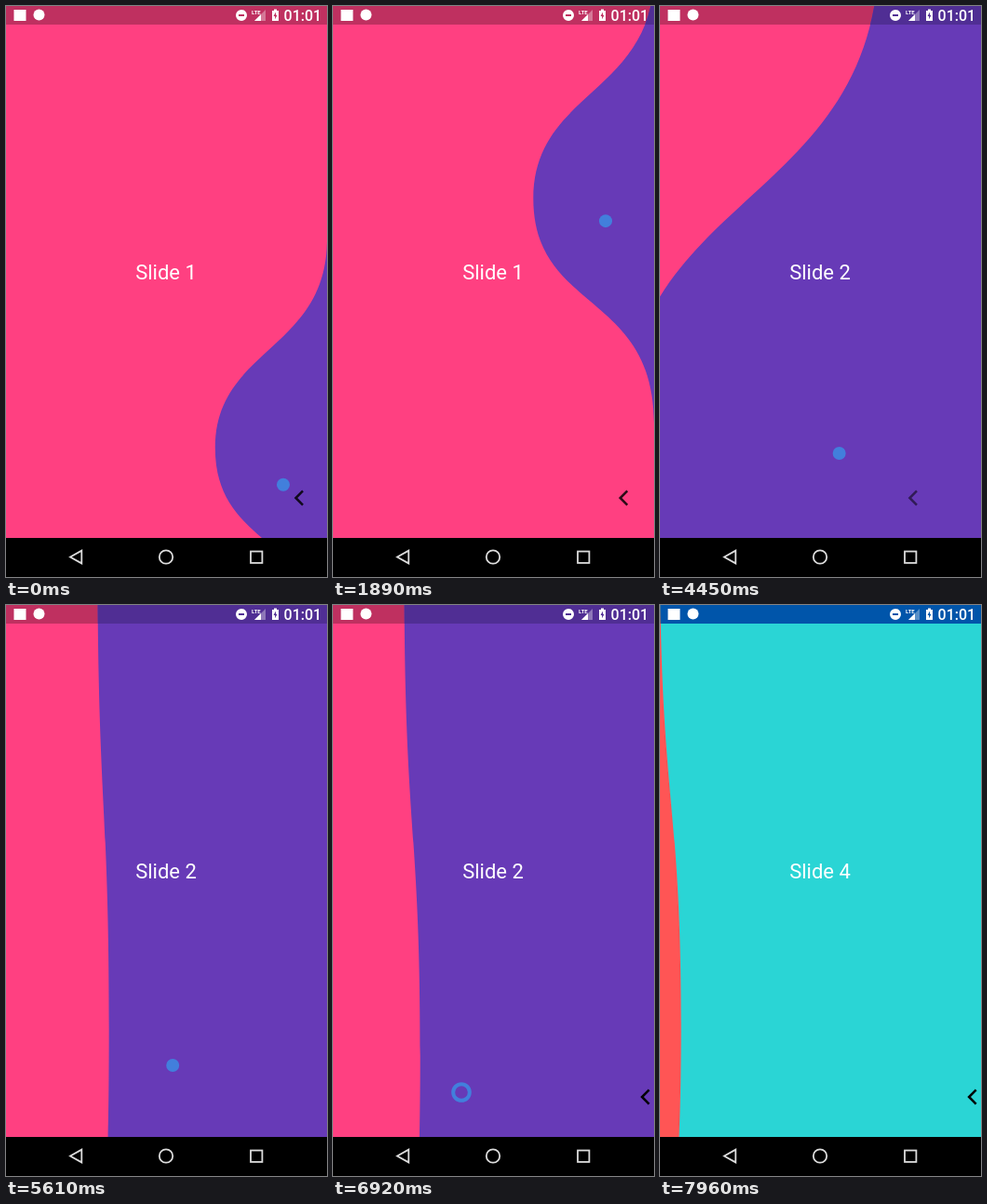
Write an HTML page that moves like this. It is 345x614 px and loops after 8 s.

```html
<!DOCTYPE html>
<html lang="en">
<head>
<meta charset="utf-8">
<title>Liquid swipe</title>
<style>
html, body { margin: 0; width: 100%; height: 100%; overflow: hidden; background: #000; }
svg { display: block; width: 100vw; height: 100vh; }
text { font-family: Roboto, sans-serif; fill: #fff; }
</style>
</head>
<body>
<svg viewBox="0 0 345 614">
  <defs><clipPath id="clip"><path id="wave"/></clipPath></defs>
  <g id="back"><rect width="345" height="573"/><rect width="345" height="20"/><text x="172" y="294" font-size="22" text-anchor="middle"></text></g>
  <g clip-path="url(#clip)">
    <g id="front"><rect width="345" height="573"/><rect width="345" height="20"/><text x="172" y="294" font-size="22" text-anchor="middle"></text></g>
  </g>
  <path id="arrow" d="M5.2 521.4L-2.4 529L5.2 536.6" fill="none" stroke="#000" stroke-width="2.5"/>
  <g fill="#fff">
    <rect x="8.5" y="4" width="13" height="12"/>
    <circle cx="35.5" cy="9.5" r="6"/>
    <path fill-rule="evenodd" d="M247 10a6 6 0 1 0 12 0a6 6 0 1 0-12 0M250 9h6v2h-6z"/>
    <text x="264" y="8.6" font-size="6" font-weight="700">LTE</text>
    <path d="M267 16L279 4V16z" opacity=".35"/>
    <path d="M267 16L274 9V16z"/>
    <path fill-rule="evenodd" d="M286 5h2v-1.5h3V5h2v11h-7zM290 6.5l-2.5 4.4h1.6v3.4l2.4-4.5h-1.5z"/>
    <text x="298.6" y="16" font-size="16" font-weight="500">01:01</text>
  </g>
  <circle id="touch" stroke-width="4"/>
  <rect y="572" width="345" height="42"/>
  <g fill="none" stroke="#dcdcdc" stroke-width="1.8">
    <path d="M69 592.5L81.3 585.6V599.4z"/>
    <circle cx="172" cy="592.5" r="7.2"/>
    <rect x="263" y="586.5" width="12.4" height="12.4"/>
  </g>
</svg>
<script>
const $ = id => document.getElementById(id);
const LOOP = 8000, W = 345;
const LAG = 100;      // the wave trails the finger
const SETTLE = 150;   // time to finish a swipe
const PEAK = .4;      // progress at which the wave is largest
const MAX_RX = 276, MAX_RY = 515;

// body colour, status bar colour
const PAGES = [
  ['#ff4081', '#bf3060'],
  ['#673ab7', '#502e94'],
  ['#ff5555', '#bf4040'],
  ['#2ad5d5', '#0055aa']
];

// Each path holds finger positions as [time, x, y].
const GESTURES = [
  { page: 1, lift: 4975, settle: 4780, path: [
    [0, 298, 515], [300, 290, 460], [600, 290, 460], [810, 290, 395],
    [910, 294, 364], [1000, 293, 352], [1130, 293, 352], [2150, 293, 190],
    [2500, 307, 190], [2980, 307, 292], [4000, 297, 485], [4210, 297, 485],
    [4350, 219, 485], [4450, 193, 481], [4780, 80, 481]] },
  { page: 1, lift: 6885, settle: 6918, path: [
    [5210, 36, 495], [5510, 147, 495], [5610, 179, 495], [6150, 290, 500],
    [6680, 290, 515], [6800, 138, 524]] },
  { page: 2, lift: 7290, settle: 7290, path: [[7070, 336, 510], [7290, 110, 508]] },
  { page: 3, lift: 7760, settle: 7931, path: [[7440, 336, 500], [7760, 110, 492]] }
];

const clamp = (v, a = 0, b = 1) => Math.min(b, Math.max(a, v));
const mix = (a, b, u) => a + (b - a) * u;

function fingerAt(path, t) {
  const i = clamp(path.findIndex(k => k[0] > t), 1, path.length - 1);
  const [a, b] = t >= path[path.length - 1][0] ? path.slice(-2) : [path[i - 1], path[i]];
  const u = clamp((t - a[0]) / (b[0] - a[0]));
  return [mix(a[1], b[1], u), mix(a[2], b[2], u)];
}

// The wave grows up to the peak, then collapses and bulges the other way.
function radiusX(p) {
  if (p < PEAK) return (48 + 570 * p) * clamp(p / .05);
  const t = (p - PEAK) / (1 - PEAK);
  return (MAX_RX + 24) * Math.exp(-8.5 * t) - 24 * clamp(3 * (1 - t));
}

function wavePath(p, cy) {
  const edge = W * (1 - clamp((p - .2) / .6));
  const rx = radiusX(p);
  const ry = p < PEAK ? rx * MAX_RY / MAX_RX : MAX_RY;
  const tip = edge - rx;
  return `M400 -900H${edge}V${cy - ry}` +
    `C${edge} ${cy - .465 * ry} ${tip} ${cy - .479 * ry} ${tip} ${cy}` +
    `C${tip} ${cy + .504 * ry} ${edge} ${cy + .415 * ry} ${edge} ${cy + ry}` +
    'V1500H400z';
}

function set(el, attrs) {
  for (const k in attrs) el.setAttribute(k, attrs[k]);
}

function setPage(group, n) {
  const [body, bar, label] = group.children;
  set(body, { fill: PAGES[n][0] });
  set(bar, { fill: PAGES[n][1] });
  label.textContent = 'Slide ' + (n + 1);
}

function draw(t) {
  const { page, lift, settle, path } = GESTURES.filter(g => g.path[0][0] <= t).pop();
  const held = t < lift;
  const [fx, fy] = fingerAt(path, t);
  const [wx, wy] = fingerAt(path, Math.min(t, settle) - LAG);
  const p = mix(clamp((336 - wx) / 300), 1, clamp((t - settle) / SETTLE));

  setPage($('back'), page - 1);
  setPage($('front'), page);
  set($('wave'), { d: wavePath(p, wy - 40) });

  set($('arrow'), {
    transform: `translate(${334.5 - (held ? 163 * p : 0)} 0)`,
    opacity: held ? clamp(Math.min(1 - 1.2 * p, 3 * (.6 - p))) : 1
  });

  // a dot while touching, a growing ring on release
  const u = (t - lift) / 85;
  set($('touch'), {
    cx: fx, cy: fy,
    r: held ? 7 : 5 + 9 * clamp(u),
    fill: held ? '#427fdc' : 'none',
    stroke: held ? 'none' : '#427fdc',
    visibility: u < 1 ? 'visible' : 'hidden'
  });
}

const start = performance.now();
function tick() {
  draw((performance.now() - start) % LOOP);
  requestAnimationFrame(tick);
}
tick();
</script>
</body>
</html>
```
